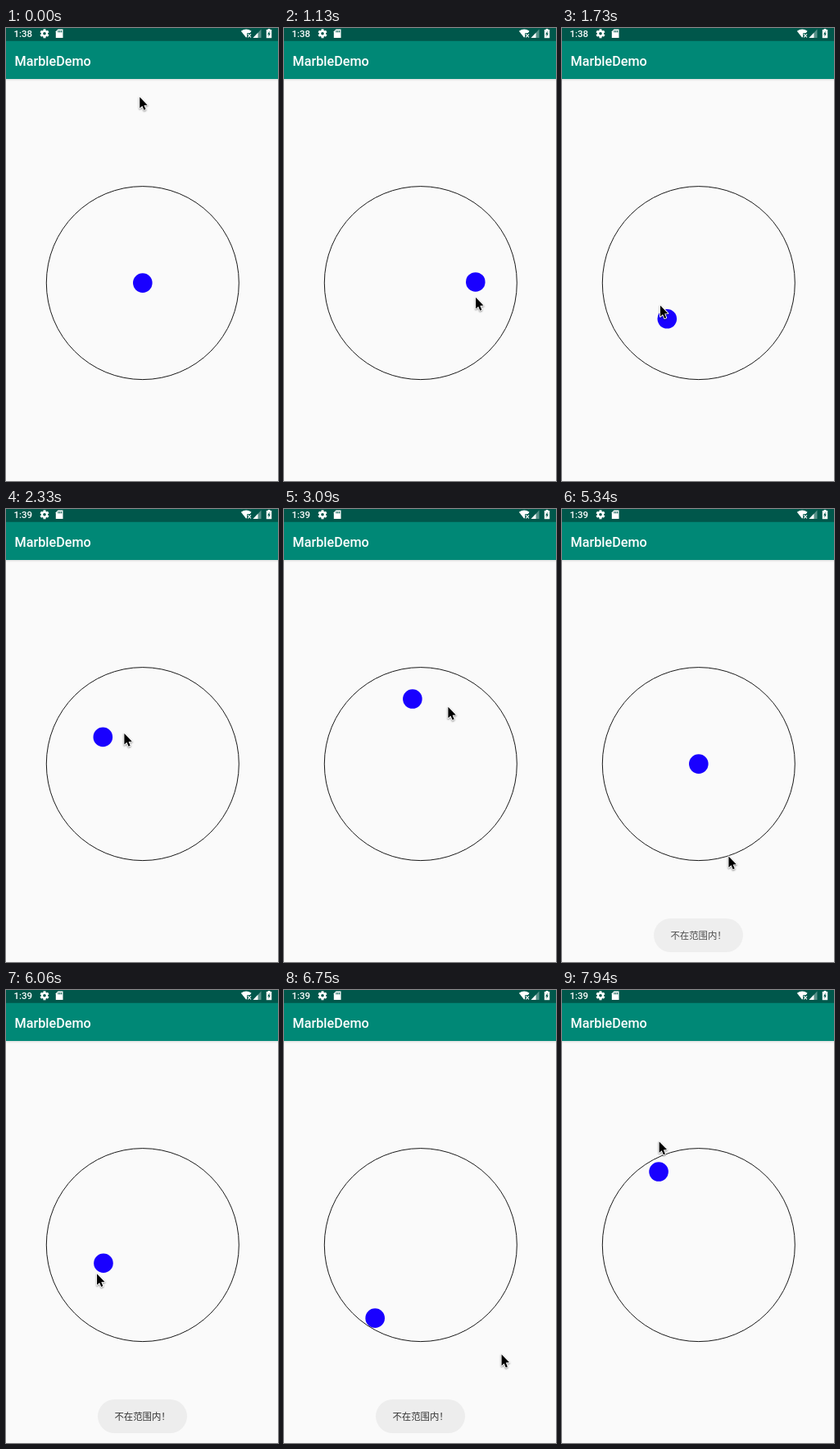
These frames come from a looping animation (332 by 551 pixels, 8000 ms). An HTML page with a canvas:

```html
<!DOCTYPE html>
<html lang="zh-CN">
<head>
<meta charset="utf-8">
<title>MarbleDemo</title>
<style>
  html, body { margin: 0; width: 100%; height: 100%; overflow: hidden; background: #fafafa; }
  canvas { display: block; width: 332px; height: 551px; }
</style>
</head>
<body>
<canvas id="stage"></canvas>
<script>
const W = 332, H = 551, LOOP = 8000, STEP = 58.6;
const HOME = [166.8, 310.1], RING = 117.5, BALL = 11.8;
const canvas = document.getElementById('stage');
const ctx = canvas.getContext('2d');
const ratio = window.devicePixelRatio || 1;
canvas.width = W * ratio;
canvas.height = H * ratio;

// Runs of screen updates: start in ms, first step, last step
const runs = [[180, 1, 63], [4050, 64, 110], [6930, 111, 128]];

// Pointer sweeps around the ring's centre: step, angle in degrees, radius
const sweeps = [
  [
    [0, -91, 227], [6, -100, 9], [8, -180, 40], [11, -144, 86], [16, -1, 67],
    [17, 14.2, 69], [23, 73, 70], [28, 165, 52], [36, 214, 58.5], [37, 239, 44.3],
    [42.5, 412, 86], [52, 720, 75], [58, 911, 78], [63, 986, 150]
  ],
  [
    [64, -94, 150], [77, -1, 70], [80, 37, 103], [83, 67, 165], [86, 72, 117.3],
    [92, 110, 8], [96, 157, 41], [101, 122, 105], [105, 102, 144], [110, 53.4, 165],
    [115, 45.7, 105], [119, -30, 65], [124, -118.7, 101.5], [126, -123, 139], [128, -111, 135.5]
  ]
];

// Drags: first step, last step, whether the ball goes home on release
const drags = [[7, 54, true], [93, 101, false], [115, 124, false]];

const clamp = (v, a, b) => Math.max(a, Math.min(b, v));

function stepAt(t) {
  let n = 0;
  for (const [start, first, last] of runs) {
    if (t >= start) n = Math.min(last, first + Math.floor((t - start) / STEP));
  }
  return n;
}

// Smooth curve through the keys, read at step n for column k
function spline(keys, n, k) {
  const end = keys.length - 1;
  const slope = i => {
    const a = keys[Math.max(i - 1, 0)], b = keys[Math.min(i + 1, end)];
    return (b[k] - a[k]) / (b[0] - a[0]);
  };
  let i = 0;
  while (i < end - 1 && keys[i + 1][0] <= n) i++;
  const a = keys[i], b = keys[i + 1], d = b[0] - a[0];
  const u = clamp((n - a[0]) / d, 0, 1), v = 1 - u;
  return a[k] * v * v * (1 + 2 * u) + b[k] * u * u * (1 + 2 * v) +
    d * u * v * (slope(i) * v - slope(i + 1) * u);
}

function pointer(n) {
  const keys = sweeps[n < 64 ? 0 : 1];
  const angle = spline(keys, n, 1) * Math.PI / 180, r = spline(keys, n, 2);
  return [HOME[0] + r * Math.cos(angle), HOME[1] + r * Math.sin(angle)];
}

// The ball trails the pointer by one step while dragged
function ballAt(n) {
  let p = HOME;
  for (const [from, to, home] of drags) {
    if (n > from) p = home && n > to ? HOME : pointer(Math.min(n - 1, to));
  }
  return p;
}

function toastAlpha(n) {
  if (n < 64) return 0;
  const rise = Math.min(0.24 + 0.16 * (n - 64), n < 92 ? 0.87 : 1);
  return rise * clamp((121 - n) / 5, 0, 1);
}

function rect(x, y, w, h, color) {
  ctx.fillStyle = color;
  ctx.fillRect(x, y, w, h);
}

function poly(points, color) {
  ctx.beginPath();
  points.forEach(([x, y]) => ctx.lineTo(x, y));
  ctx.closePath();
  if (color) {
    ctx.fillStyle = color;
    ctx.fill();
  }
}

function disc(x, y, r, color) {
  ctx.beginPath();
  ctx.arc(x, y, r, 0, Math.PI * 2);
  ctx.fillStyle = color;
  ctx.fill();
}

function text(str, x, y, font, color) {
  ctx.font = font;
  ctx.fillStyle = color;
  ctx.fillText(str, x, y);
}

function gear(x, y, hole) {
  ctx.save();
  ctx.translate(x, y);
  for (let i = 0; i < 6; i++) {
    rect(-1.5, -5.5, 3, 3, '#fff');
    ctx.rotate(Math.PI / 3);
  }
  ctx.restore();
  disc(x, y, 4.1, '#fff');
  disc(x, y, 1.8, hole);
}

function wifi(x, y, back) {
  ctx.beginPath();
  ctx.moveTo(x, y + 5.8);
  ctx.lineTo(x - 6.4, y - 2.2);
  ctx.quadraticCurveTo(x, y - 6.6, x + 6.4, y - 2.2);
  ctx.closePath();
  ctx.fillStyle = '#fff';
  ctx.fill();
  rect(x + 1, y + 0.2, 6, 6, back);
  ctx.strokeStyle = '#fff';
  ctx.lineWidth = 1.1;
  ctx.beginPath();
  for (const s of [-2, 2]) {
    ctx.moveTo(x + 3.9 - 1.9, y + 3.3 - s);
    ctx.lineTo(x + 3.9 + 1.9, y + 3.3 + s);
  }
  ctx.stroke();
}

function statusBar(n) {
  const dark = '#00574b';
  rect(0, 0, W, 15.8, dark);
  text(n < 32 ? '1:38' : '1:39', 9.5, 11, '500 11.5px Roboto, sans-serif', '#fff');
  gear(47, 6.8, dark);

  poly([[63.5, 1.5], [69.5, 1.5], [69.5, 12], [60.8, 12], [60.8, 4.3]], '#fff');
  for (let i = 0; i < 3; i++) rect(63.4 + i * 1.9, 3, 1, 2.4, dark);

  wifi(293.2, 6, dark);
  poly([[311.5, 1.5], [311.5, 12], [301.5, 12]], 'rgba(255,255,255,.35)');
  poly([[307.5, 5.8], [307.5, 12], [301.5, 12]], '#fff');

  rect(319.6, 1, 2.8, 2, '#fff');
  rect(317.8, 2, 6.4, 10.2, '#fff');
  poly([[321.6, 3.6], [319.2, 7.7], [320.7, 7.7], [320.4, 10.8], [322.8, 6.6], [321.4, 6.6]], dark);
}

function appBar() {
  const shade = ctx.createLinearGradient(0, 62, 0, 65);
  shade.addColorStop(0, 'rgba(0,0,0,.1)');
  shade.addColorStop(1, 'rgba(0,0,0,0)');
  rect(0, 62, W, 3, shade);
  rect(0, 15, W, 47, '#008876');
  text('MarbleDemo', 10.6, 46, '500 16.2px Roboto, sans-serif', '#fff');
}

function toast(alpha) {
  if (alpha <= 0) return;
  ctx.save();
  ctx.globalAlpha = alpha;
  ctx.beginPath();
  ctx.roundRect(112, 498, 109, 41, 20.5);
  ctx.fillStyle = '#ededed';
  ctx.fill();
  text('不在范围内！', 132.4, 522.8, '11.4px "Noto Sans CJK SC", "Noto Sans CJK", sans-serif', '#333');
  ctx.restore();
}

function arrow([x, y]) {
  ctx.save();
  ctx.translate(x + 0.4, y + 0.8);
  poly([[0, 0], [0, 13.6], [3.1, 10.8], [5.2, 15.8], [7.3, 14.9], [5.2, 10], [9.4, 9.7]]);
  ctx.lineJoin = 'round';
  ctx.lineWidth = 1.8;
  ctx.strokeStyle = '#fff';
  ctx.shadowColor = 'rgba(0,0,0,.45)';
  ctx.shadowBlur = 2 * ratio;
  ctx.shadowOffsetY = ratio;
  ctx.stroke();
  ctx.shadowColor = 'transparent';
  ctx.fillStyle = '#000';
  ctx.fill();
  ctx.restore();
}

function draw(t) {
  const n = stepAt(t);
  ctx.setTransform(ratio, 0, 0, ratio, 0, 0);
  rect(0, 0, W, H, '#fafafa');
  appBar();
  statusBar(n);

  ctx.beginPath();
  ctx.arc(HOME[0], HOME[1], RING, 0, Math.PI * 2);
  ctx.lineWidth = 0.9;
  ctx.strokeStyle = '#000';
  ctx.stroke();

  const [bx, by] = ballAt(n);
  disc(bx, by, BALL, '#1900ff');
  toast(toastAlpha(n));
  arrow(pointer(n));
}

const begin = performance.now();
function tick() {
  draw((performance.now() - begin) % LOOP);
  requestAnimationFrame(tick);
}
tick();
</script>
</body>
</html>
```
